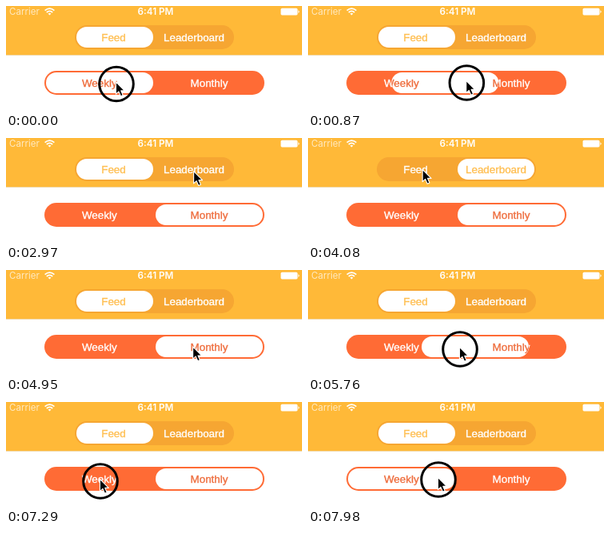
These frames come from a looping animation (370 by 130 pixels, 8000 ms). An HTML page:

```html
<!DOCTYPE html>
<html lang="en">
<head>
<meta charset="utf-8">
<title>Segmented controls</title>
<style>
  html, body { margin: 0; width: 100%; height: 100%; overflow: hidden; background: #fff; }
  svg { display: block; width: 370px; height: 130px; }
  .label { font: 13.4px "Liberation Sans", Arial, sans-serif; text-anchor: middle; stroke-width: .35; }
  .status { font-family: Inter, sans-serif; fill: #fff; }
</style>
</head>
<body>
<svg id="stage" viewBox="0 0 370 130">
  <rect width="370" height="130" fill="#fff"/>
  <rect width="370" height="61.5" fill="#ffb938"/>
  <rect y="61" width="370" height="1" fill="#f1d9ac"/>
  <text class="status" x="4" y="11.4" font-size="11.6" opacity=".68" textLength="auto">Carrier</text>
  <g fill="none" stroke="#fff" stroke-width="1.7">
    <path d="M48.6 5.6Q54.5 .6 60.4 5.6M50.8 8Q54.5 4.9 58.2 8"/>
    <path d="M54.5 11.4L52.6 9.4Q54.5 8 56.4 9.4Z" fill="#fff" stroke="none"/>
  </g>
  <text class="status" x="187" y="11.4" font-size="11.7" font-weight="600" text-anchor="middle">6:41 PM</text>
  <rect x="343.5" y="2.8" width="21" height="8.6" rx="1.6" fill="#fff"/>
  <path d="M365.4 5.3Q368 7.1 365.4 8.9Z" fill="#fff"/>
  <g id="controls"></g>
  <g id="pointer">
    <circle id="ring" r="21.3" fill="none" stroke="#000" stroke-width="3"/>
    <path d="M-.6 -2.6V12.6L2.9 9.4L5.5 15.2L8.2 14L5.7 8.4H10.3Z"
      fill="#000" stroke="#fff" stroke-width="1.1" stroke-linejoin="round"/>
  </g>
</svg>
<script>
const LOOP = 8000;
const $ = id => document.getElementById(id);

function makeControl({ id, x, y, w, fill, ink, thumbW, labels }) {
  const text = color => labels.map(([name, cx]) =>
    `<text class="label" x="${cx}" y="${y + 19.7}" fill="${color}" stroke="${color}">${name}</text>`).join('');
  const thumb = `x="${x + 2}" y="${y + 2}" width="${thumbW}" height="26" rx="13"`;
  $('controls').insertAdjacentHTML('beforeend', `
    <clipPath id="${id}Pill"><rect x="${x}" y="${y}" width="${w}" height="30" rx="15"/></clipPath>
    <clipPath id="${id}Clip"><rect class="${id}" ${thumb}/></clipPath>
    <g clip-path="url(#${id}Pill)">
      <rect x="${x}" y="${y}" width="${w}" height="30" fill="${fill}"/>
      ${text('#fff')}
      <rect class="${id}" ${thumb} fill="#fff"/>
      <g clip-path="url(#${id}Clip)">${text(ink)}</g>
    </g>`);
  const parts = document.querySelectorAll('.' + id);
  return left => parts.forEach(p => p.setAttribute('x', left));
}

const setTop = makeControl({
  id: 'top', x: 86, y: 24, w: 199, fill: '#f6a632', ink: '#ffbe50',
  thumbW: 96, labels: [['Feed', 134.5], ['Leaderboard', 235]]
});
const setBottom = makeControl({
  id: 'bottom', x: 48, y: 81, w: 275, fill: '#ff6b35', ink: '#ee6c3c',
  thumbW: 134, labels: [['Weekly', 116.8], ['Monthly', 254]]
});

// Pointer path: time, x, y
const path = [
  [0, 138, 97.5], [180, 138, 97.5], [820, 198, 96], [1200, 205, 96], [1640, 192, 96],
  [1860, 249, 96], [2150, 286, 96], [2480, 286, 96], [3020, 234, 43], [3400, 234, 43],
  [4040, 144, 42], [4420, 136, 42], [4980, 235, 99], [5550, 235, 99], [5760, 190, 99],
  [6080, 97, 103], [6180, 97, 103], [6530, 253, 94], [6780, 253, 94], [7160, 118, 99],
  [7420, 118, 99], [7860, 163, 97], [8000, 163, 97]
];
const presses = [[0, 2380], [3110, 3240], [4200, 4330], [5080, 6140], [6560, 6669], [7200, 7310], [7900, 8000]];

const ease = u => u * u * (3 - 2 * u);
const clamp = (v, lo, hi) => Math.min(hi, Math.max(lo, v));

function pointerAt(t) {
  const i = Math.max(1, path.findIndex(p => p[0] >= t));
  const [a, b] = [path[i - 1], path[i]];
  const u = ease((t - a[0]) / (b[0] - a[0]));
  return [a[1] + (b[1] - a[1]) * u, a[2] + (b[2] - a[2]) * u];
}

// Lightly underdamped settle, about 0.3 s
function spring(ms) {
  if (ms <= 0) return 0;
  const s = ms / 1000, decay = 23, freq = 20.3;
  return 1 - Math.exp(-decay * s) * (Math.cos(freq * s) + decay / freq * Math.sin(freq * s));
}

const LEFT = 50, RIGHT = 187;
function bottomAt(t, px) {
  if (t < 2380) return clamp(px - 94, LEFT, RIGHT);
  if (t < 5080) return RIGHT;
  if (t < 6140) return clamp(px - 48, LEFT, RIGHT);
  return LEFT + (RIGHT - LEFT) * (spring(t - 6669) - spring(t - 7310));
}
const topAt = t => 88 + 99 * (spring(t - 3240) - spring(t - 4330));

function draw(t) {
  const [x, y] = pointerAt(t);
  setTop(topAt(t));
  setBottom(bottomAt(t, x));
  $('pointer').setAttribute('transform', `translate(${x} ${y})`);
  const down = presses.some(([a, b]) => t >= a && t < b);
  $('ring').setAttribute('visibility', down ? 'visible' : 'hidden');
}

const start = performance.now();
function tick() {
  draw((performance.now() - start) % LOOP);
  requestAnimationFrame(tick);
}
draw(0);
requestAnimationFrame(tick);
</script>
</body>
</html>
```
